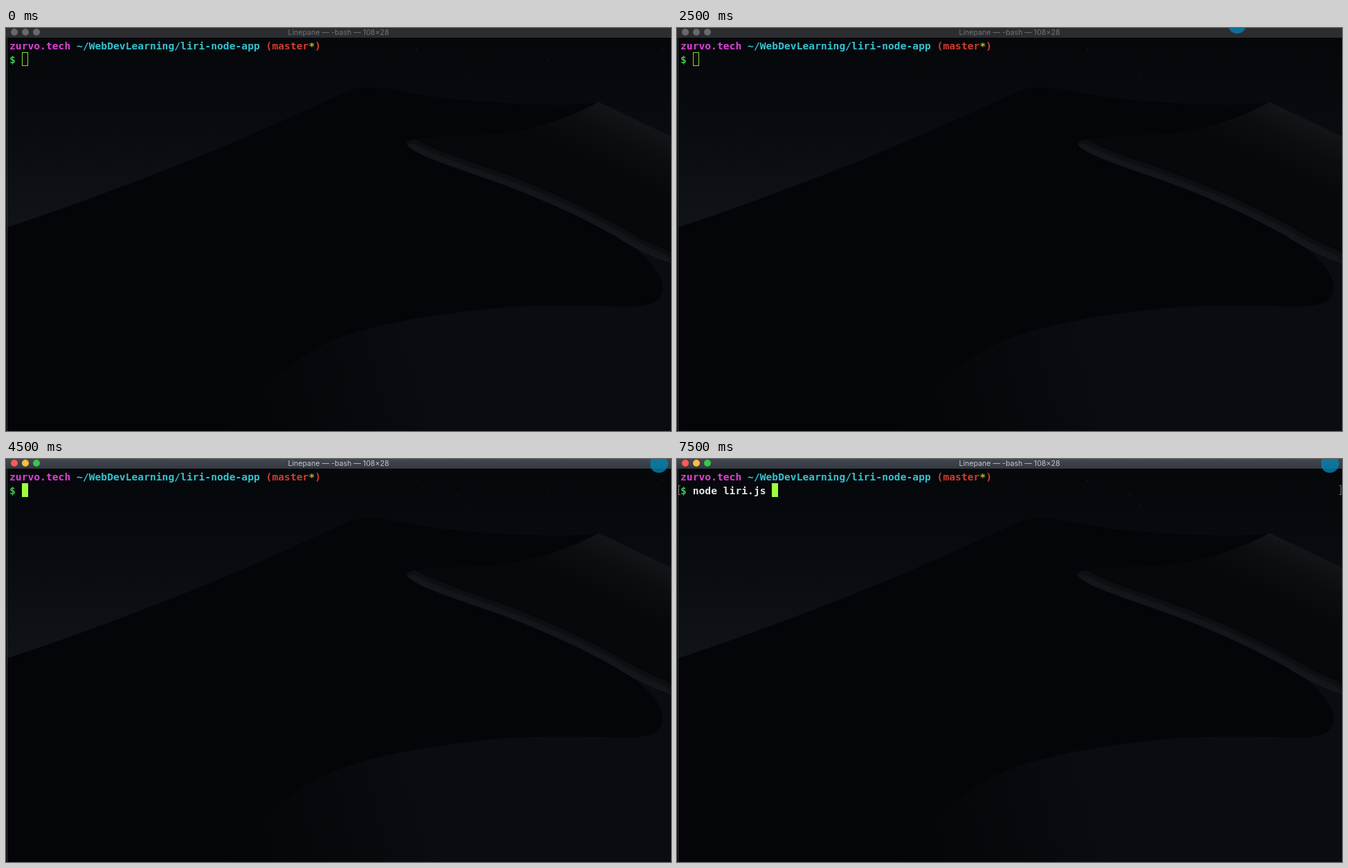
An HTML page that plays this animation: 961x583 px, repeating every 8 s.

```html
<!DOCTYPE html>
<html lang="en">
<head>
<meta charset="utf-8">
<title>Shell session</title>
<style>
  html, body { margin: 0; width: 100%; height: 100%; overflow: hidden; background: #030508; }
  #stage { position: relative; width: 961px; height: 583px; overflow: hidden; }
  #stage > * { position: absolute; }
  svg { left: 0; top: 0; }

  .line {
    left: 5px; display: flex; white-space: pre;
    font: bold 14.67px/20px "DejaVu Sans Mono", monospace;
  }
  .host { color: #de3fd8; }
  .path { color: #35c3d0; }
  .branch { color: #d23c2c; }
  .dirty { color: #b9b92d; }
  .sign { color: #3bc84c; }
  .typed { color: #e4e5e6; width: 0; overflow: hidden; }

  .cursor { box-sizing: border-box; width: 9px; height: 20px; margin-top: -1px; border: 1px solid #86d936; }
  .bracket { top: 38px; width: 2px; height: 12px; border: 1px solid #74777b; opacity: 0; }
  .left { left: 2px; border-right: 0; }
  .right { left: 957px; border-left: 0; }

  .bar {
    left: 0; top: 0; width: 961px; height: 14px; text-align: center;
    font: 10.6px/14px Inter, sans-serif;
    background: #2c2d31; color: #727377;
  }
  .bar i { position: absolute; top: 1px; width: 10px; height: 10px; border-radius: 50%; background: #68696b; }
  .bar i:nth-of-type(1) { left: 7px; }
  .bar i:nth-of-type(2) { left: 23px; }
  .bar i:nth-of-type(3) { left: 39px; }
  .focused { background: linear-gradient(#434750, #343840); color: #c3c6cb; opacity: 0; }
  .focused i:nth-of-type(1) { background: #fc5b55; }
  .focused i:nth-of-type(2) { background: #fdbd40; }
  .focused i:nth-of-type(3) { background: #34c84a; }

  .dot { left: -13px; top: -13px; width: 26px; height: 26px; border-radius: 50%; background: rgba(4, 130, 178, .8); }
  .ring { left: 926px; top: 3px; width: 34px; height: 34px; box-sizing: border-box; border: 2px solid #0d4054; border-radius: 50%; opacity: 0; }

  .typed, .cursor, .bracket, .focused, .dot, .ring {
    animation: 8s step-end infinite;
  }
  .typed { animation-name: type; }
  .cursor { animation-name: blink; }
  .bracket { animation-name: mark; }
  .focused { animation-name: focus; }
  .dot { animation-name: point; }
  .ring { animation-name: press; }

  @keyframes type {
    0% { width: 0; }
    68.75% { width: 2ch; }
    75% { width: 3ch; }
    78.125% { width: 5ch; }
    81.25% { width: 6ch; }
    87.5% { width: 7ch; }
    93.75%, 100% { width: 13ch; }
  }
  @keyframes blink {
    0% { background: transparent; border-color: #86d936; }
    43.75%, 56.25%, 68.75%, 100% { background: #9eff3d; border-color: #9eff3d; }
    50%, 62.5% { background: transparent; border-color: transparent; }
  }
  @keyframes mark { 0% { opacity: 0; } 93.75%, 100% { opacity: 1; } }
  @keyframes focus { 0% { opacity: 0; } 43.75%, 100% { opacity: 1; } }
  @keyframes point {
    0%, 21.875%, 43.75% { transform: translate(-50px, -50px); }
    12.5% { transform: translate(3px, 47px); }
    15.625% { transform: translate(2px, 53px); }
    18.75% { transform: translate(19px, 255px); }
    31.25% { transform: translate(809.5px, -5px); }
    34.375% { transform: translate(899px, 6px); }
    37.5% { transform: translate(926px, 7px); }
    40.625% { transform: translate(941px, 7px); }
    53.125%, 100% { transform: translate(943.5px, 7px); }
  }
  @keyframes press {
    0%, 53.125%, 100% { opacity: 0; transform: none; }
    43.75% { opacity: 1; transform: none; }
    46.875%, 50% { opacity: 1; transform: scale(1.04); }
  }
</style>
</head>
<body>
<div id="stage">
  <svg width="961" height="583" viewBox="0 0 961 583">
    <defs>
      <linearGradient id="sky" x2="0" y2="1">
        <stop offset="0" stop-color="#05070a"/>
        <stop offset=".25" stop-color="#080b0f"/>
        <stop offset=".5" stop-color="#101317"/>
      </linearGradient>
      <linearGradient id="face" gradientUnits="userSpaceOnUse" x1="905" y1="128" x2="868" y2="206">
        <stop offset="0" stop-color="#141518"/>
        <stop offset=".45" stop-color="#0b0d10"/>
        <stop offset="1" stop-color="#06080b"/>
      </linearGradient>
      <linearGradient id="sand" gradientUnits="userSpaceOnUse" x1="360" y1="540" x2="600" y2="470">
        <stop offset="0" stop-color="#040609"/>
        <stop offset="1" stop-color="#090c10"/>
      </linearGradient>
      <path id="slope" d="M856 107 L961 157 V340 Q930 329 903 314 C865 291 800 257 720 227 C660 205 582 182 579 167 C580 155 660 159 720 152 C780 144 830 122 856 107Z"/>
      <clipPath id="inSlope"><use href="#slope"/></clipPath>
      <filter id="soft" x="-20%" y="-20%" width="140%" height="140%"><feGaussianBlur stdDeviation="8"/></filter>
    </defs>

    <rect width="961" height="583" fill="url(#sky)"/>
    <path fill="#030508" d="M0 289 C150 239 280 187 380 143 C440 116 480 97 500 89 C520 84 545 85 575 92 C630 104 720 110 800 111 Q840 110 856 107 L961 350 V583 H0Z"/>

    <use href="#slope" fill="url(#face)"/>
    <g clip-path="url(#inSlope)">
      <path filter="url(#soft)" fill="none" stroke="#222326" stroke-width="13" d="M579 167 C582 182 660 205 720 227 C800 257 865 291 903 314 Q930 329 961 340"/>
    </g>

    <path fill="url(#sand)" d="M903 314 Q930 329 961 340 V583 H320 C345 542 390 500 425 478 Q460 454 510 439 C560 424 640 411 720 404 C780 400 850 402 900 403 C935 402 949 395 949 375 C949 357 930 334 903 314Z"/>
    <path fill="none" stroke="#1b1c1f" stroke-width="2" opacity=".6" d="M885 303 Q925 328 961 339"/>

    <g fill="#2a2e33">
      <circle cx="593" cy="31" r=".7"/><circle cx="654" cy="52" r=".7"/>
      <circle cx="669" cy="67" r=".7"/><circle cx="783" cy="46" r=".7"/>
      <circle cx="949" cy="31" r=".7"/>
    </g>
    <path fill="#000" d="M0 14h1v569h-1z"/>
    <path fill="#35373a" d="M1 14h1v569h-1z"/>
  </svg>

  <div class="line" style="top:16px"><span class="host">zurvo.tech</span> <span class="path"> ~/WebDevLearning/liri-node-app</span><span class="branch"> (master<span class="dirty">*</span>)</span></div>
  <div class="line" style="top:36px"><span class="sign">$ </span><span class="typed">node liri.js </span><span class="cursor"></span></div>
  <div class="bracket left"></div>
  <div class="bracket right"></div>

  <div class="bar"><i></i><i></i><i></i>Linepane — -bash — 108×28</div>
  <div class="bar focused"><i></i><i></i><i></i>Linepane — -bash — 108×28</div>

  <div class="ring"></div>
  <div class="dot"></div>
</div>
</body>
</html>
```
